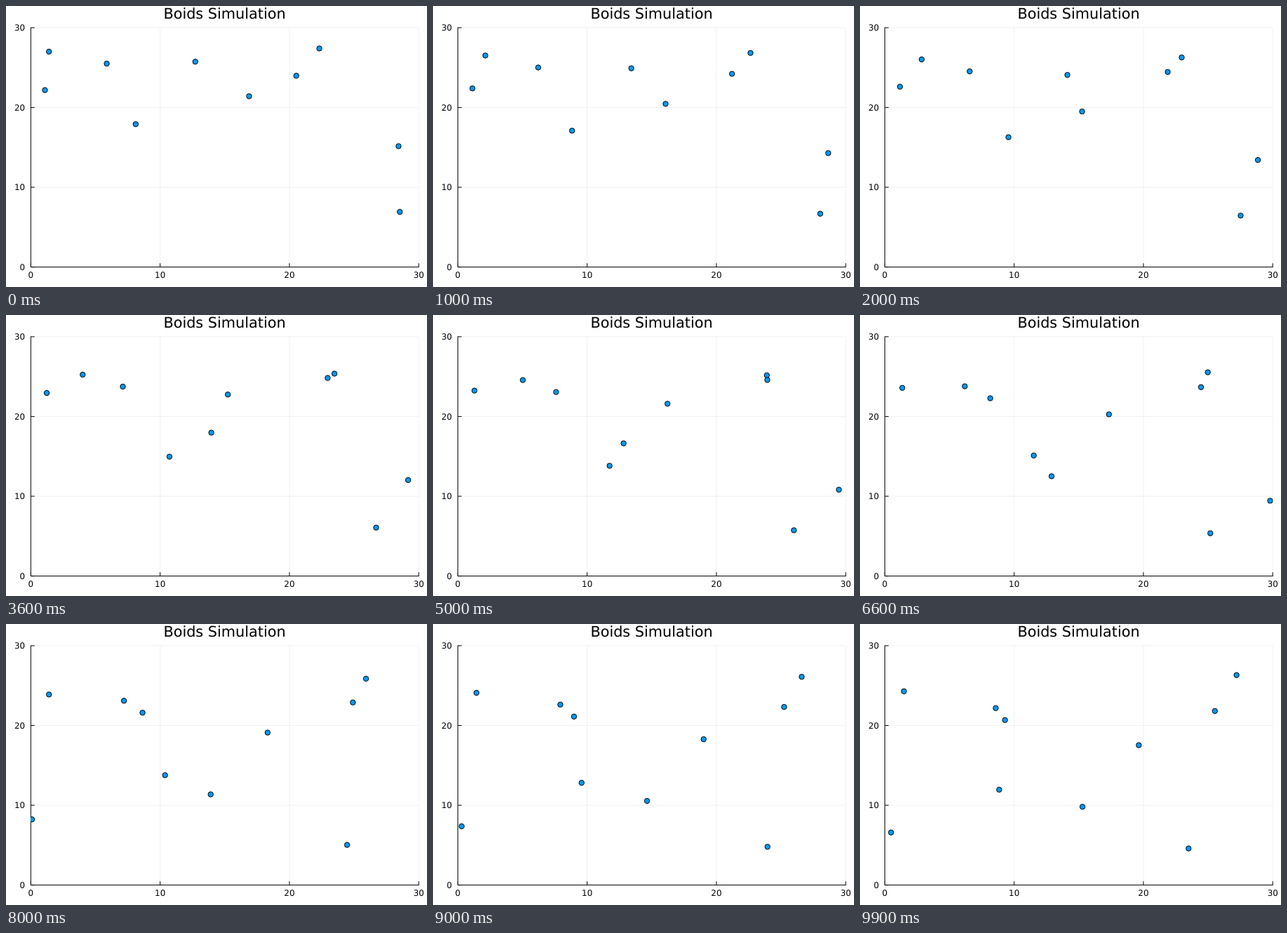
Recreate the animation shown at these times as an HTML page. Size 600 by 400 pixels, loop 10000 ms.

```html
<!DOCTYPE html>
<html>
<head>
<meta charset="utf-8">
<style>
  html, body { margin: 0; width: 100%; height: 100%; overflow: hidden; background: #fff; }
  svg { display: block; }
  text { font: 11.9px "DejaVu Sans", sans-serif; text-anchor: middle; text-rendering: geometricPrecision; }
  .title { font-size: 20.8px; }
  .end { text-anchor: end; }
  path { fill: none; stroke: #000; }
  .grid { stroke-opacity: .1; stroke-width: .6; }
  circle { fill: #009afa; stroke: #000; }
</style>
</head>
<body>
<svg width="600" height="400" viewBox="0 0 600 400">
  <clipPath id="area"><rect x="35" y="30.5" width="553.5" height="341"/></clipPath>
  <text class="title" x="311.5" y="18.4">Boids Simulation</text>
  <g id="axes"></g>
  <g id="boids" clip-path="url(#area)"></g>
</svg>
<script>
const WORLD = 30, LEFT = 35.4, RIGHT = 588.2, TOP = 30.9, BOTTOM = 371.6;
const STEP = 0.1, LOOP = 10; // seconds

// Start point and velocity per second, in world units
const boids = [
  { at: [1.4, 27], v: [.725, -.487] },
  { at: [1.09, 22.18], v: [.039, .213] },
  { at: [5.87, 25.5], v: [.346, -.487] },
  { at: [8.11, 17.91], v: [.725, -.818] },
  { at: [12.72, 25.74], v: [.699, -.829] },
  { at: [16.88, 21.41], v: [-.812, -.955] },
  { at: [20.53, 23.98], v: [.674, .236] },
  { at: [22.31, 27.4], v: [.325, -.564] },
  { at: [28.44, 15.15], v: [.206, -.865] },
  { at: [28.54, 6.92], v: [-.51, -.236] }
];

const toX = x => LEFT + (RIGHT - LEFT) * x / WORLD;
const toY = y => BOTTOM + (TOP - BOTTOM) * y / WORLD;
const wrap = p => (p + WORLD) % WORLD;

function add(parent, tag, attrs, text = '') {
  const el = document.createElementNS('http://www.w3.org/2000/svg', tag);
  for (const key in attrs) el.setAttribute(key, attrs[key]);
  el.textContent = text;
  return parent.appendChild(el);
}

const axes = document.getElementById('axes');
let grid = '', lines = `M${LEFT} ${TOP - .4}V${BOTTOM}H${RIGHT + .4}`;
for (let value = 0; value <= WORLD; value += 10) {
  const x = toX(value), y = toY(value);
  grid += `M${x} ${TOP}V${BOTTOM}M${LEFT} ${y}H${RIGHT}`;
  lines += `M${x} ${BOTTOM}v-5.4M${LEFT} ${y}h5.4`;
  add(axes, 'text', { x, y: 387.4 }, value);
  add(axes, 'text', { x: 27.2, y: y + 4.3, class: 'end' }, value);
}
add(axes, 'path', { d: grid, class: 'grid' });
add(axes, 'path', { d: lines });

const group = document.getElementById('boids');
for (const boid of boids) boid.dot = add(group, 'circle', { r: 3.7 });

function draw(ms) {
  const time = Math.floor(ms / 1000 % LOOP / STEP) * STEP;
  for (const { at, v, dot } of boids) {
    const [x, y] = at.map((p, axis) => wrap(p + v[axis] * time));
    dot.setAttribute('cx', toX(x));
    dot.setAttribute('cy', toY(y));
  }
}

const start = performance.now();
function tick() {
  draw(performance.now() - start);
  requestAnimationFrame(tick);
}
tick();
</script>
</body>
</html>
```
